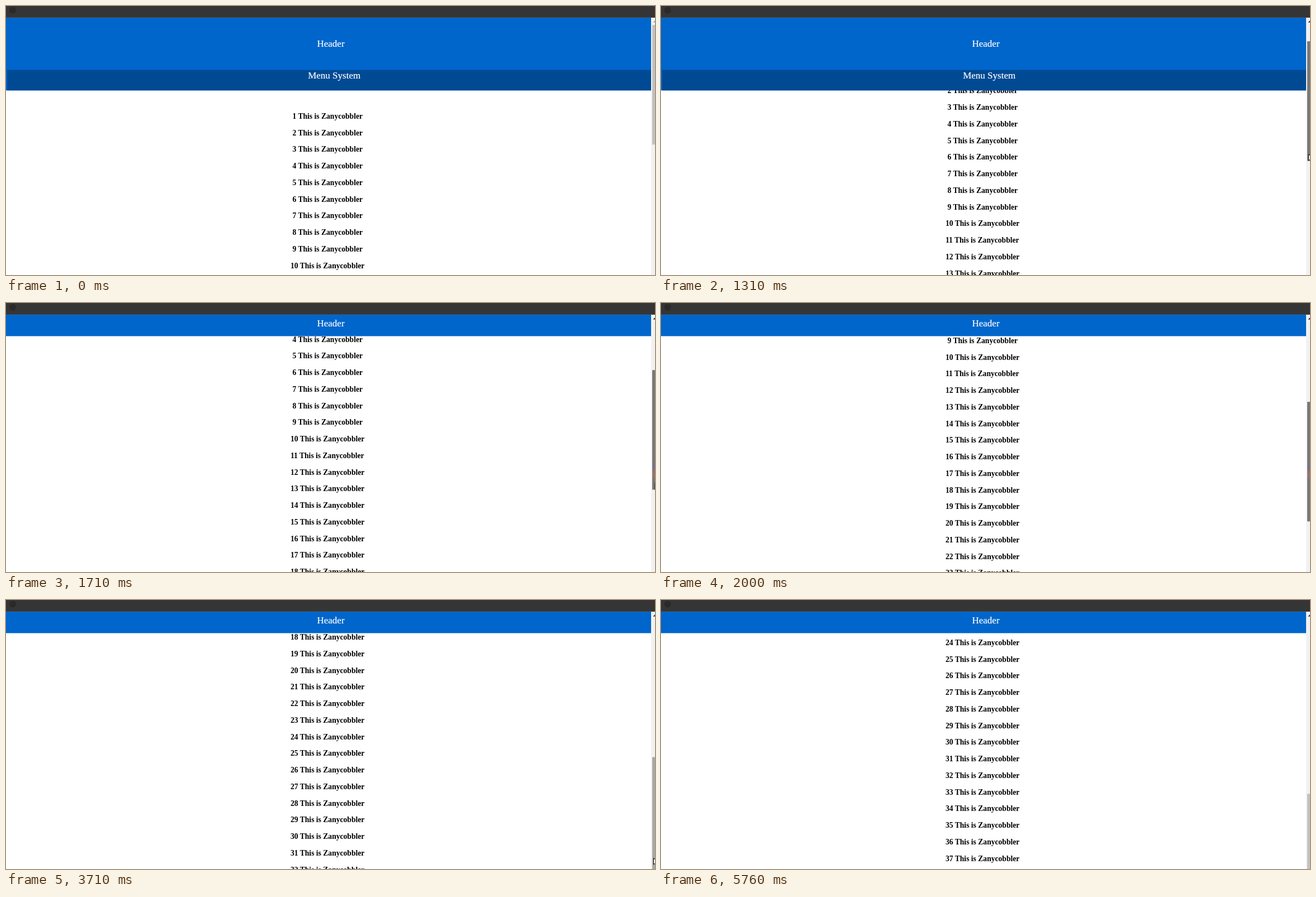
Write an HTML page that moves like this. It is 1161 px wide and 482 px high and loops after 6.76 s.

```html
<!DOCTYPE html>
<html lang="en">
<head>
<meta charset="utf-8">
<title>Shrinking header on scroll</title>
<style>
  html, body { margin: 0; width: 100%; height: 100%; overflow: hidden; background: #fff; }
  svg { display: block; }
  text { font-family: "Liberation Serif", "Times New Roman", serif; white-space: pre; }
  #rows { font-size: 13.6px; font-weight: bold; fill: #000; }
  .label { font-size: 17px; fill: #fff; stroke: #fff; stroke-width: .2px; }
</style>
</head>
<body>
<svg width="1161" height="482" viewBox="0 0 1161 482">
  <defs>
    <linearGradient id="tint" x2="0" y2="1">
      <stop offset="0" stop-color="#76a" stop-opacity="0"/>
      <stop offset=".3" stop-color="#76a" stop-opacity=".4"/>
      <stop offset=".65" stop-color="#c74" stop-opacity=".4"/>
      <stop offset="1" stop-color="#76a" stop-opacity="0"/>
    </linearGradient>
  </defs>

  <g id="rows"></g>

  <rect id="header" y="21" width="1154" fill="#0066cc"/>
  <text id="title" class="label" x="556.5">Header</text>
  <svg id="menu" x="2" width="1152" overflow="hidden">
    <rect width="1152" height="40" fill="#004a94"/>
    <text class="label" x="538.2" y="15.7">Menu System</text>
  </svg>

  <rect x="1154" y="21" width="7" height="461" fill="#f1f1f1"/>
  <path id="arrow" d="M1157.5 29.5L1161 26V29.5Z"/>
  <rect id="thumb" x="1156" width="5" height="214.3"/>
  <rect id="glow" x="1156" y="282" width="5" height="40" fill="url(#tint)"/>

  <rect width="1161" height="21" fill="#353535"/>
  <rect y="20" width="1161" height="1" fill="#4a4a44"/>
  <circle cx="12" cy="7.5" r="6" fill="#2a2a2a"/>

  <path id="cursor" d="M.5 .5V12L3.2 9.6L5 13.5L6.8 12.7L5.1 9H8.7Z" fill="#fff" stroke="#000"/>
</svg>
<script>
const LOOP = 6760;
const SCROLL_RATIO = 2.57;
const ROW_PITCH = 29.75;
const FIRST_BASELINE = 201.75;
const $ = id => document.getElementById(id);

const clamp = k => Math.min(1, Math.max(0, k));
const mix = (a, b, k) => a + (b - a) * k;
const smooth = k => k * k * (3 - 2 * k);
const within = (t, from, to) => t >= from && t < to;

// Screen updates seen since `from`, counted from zero.
const stepsSince = (t, from, length) => Math.floor((t - from) / length);

// Linear interpolation through [position, value] points.
function through(points, k) {
  const next = points.findIndex(point => point[0] > k);
  if (next === 0) return 0;
  if (next < 0) return points.at(-1)[1];
  const [[k0, v0], [k1, v1]] = points.slice(next - 1, next + 1);
  return mix(v0, v1, (k - k0) / (k1 - k0));
}

const firstDrag = [[0, 2], [3, 29.2], [6, 57.7], [12, 143.1], [17, 243], [18, 247.6]];
const secondDrag = [[0, 34.5], [2, 65.7]];

function set(id, attrs) {
  for (const name in attrs) $(id).setAttribute(name, attrs[name]);
}

const rows = Array.from({ length: 40 }, (_, i) => {
  const row = document.createElementNS($('rows').namespaceURI, 'text');
  row.textContent = `${i + 1} This is Zanycobbler`;
  row.setAttribute('x', i < 9 ? 512.5 : 509);
  $('rows').append(row);
  return row;
});

function thumbColor(t) {
  if (within(t, 1080, 3090) || within(t, 4420, 5440)) return '#787878';
  return within(t, 355, 5760) ? '#a8a8a8' : '#c1c1c1';
}

// The pointer glides in, rides the thumb off the edge and later looks in again.
function pointerAt(t, offset) {
  if (within(t, 130, 1080)) {
    const k = clamp(stepsSince(t, 130, 75) / 4);
    return [mix(1134, 1157, k), mix(296, 229, k)];
  }
  if (within(t, 1080, 3090)) return [1157 + offset * .04, 236 + offset];
  if (within(t, 3710, 4190)) {
    return [1158, mix(462, 454, clamp(stepsSince(t, 3710, 82) / 4))];
  }
  return [1170, 0];
}

function draw(t) {
  const step = stepsSince(t, 1078, 76.6);
  const offset = through(firstDrag, step) + through(secondDrag, stepsSince(t, 4570, 90));
  const shrink = smooth(clamp((step - 4) / 4));
  const bottom = mix(151.3, 59.4, shrink);
  const menuTop = mix(114.3, 59.4, shrink);

  rows.forEach((row, i) => row.setAttribute('y',
    Math.round(FIRST_BASELINE + i * ROW_PITCH - offset * SCROLL_RATIO)));
  set('header', { height: bottom - 21 });
  set('title', { y: Math.round(mix(73, 42, shrink)) });
  set('menu', { y: menuTop, height: bottom - menuTop });
  set('thumb', { y: 34 + offset, fill: thumbColor(t) });
  set('arrow', { fill: offset ? '#222' : '#a3a3a3' });
  set('glow', { opacity: within(t, 1710, 3090) ? 1 : 0 });
  set('cursor', { transform: `translate(${pointerAt(t, offset)})` });
}

const start = performance.now();
function tick() {
  draw((performance.now() - start) % LOOP);
  requestAnimationFrame(tick);
}
tick();
</script>
</body>
</html>
```
